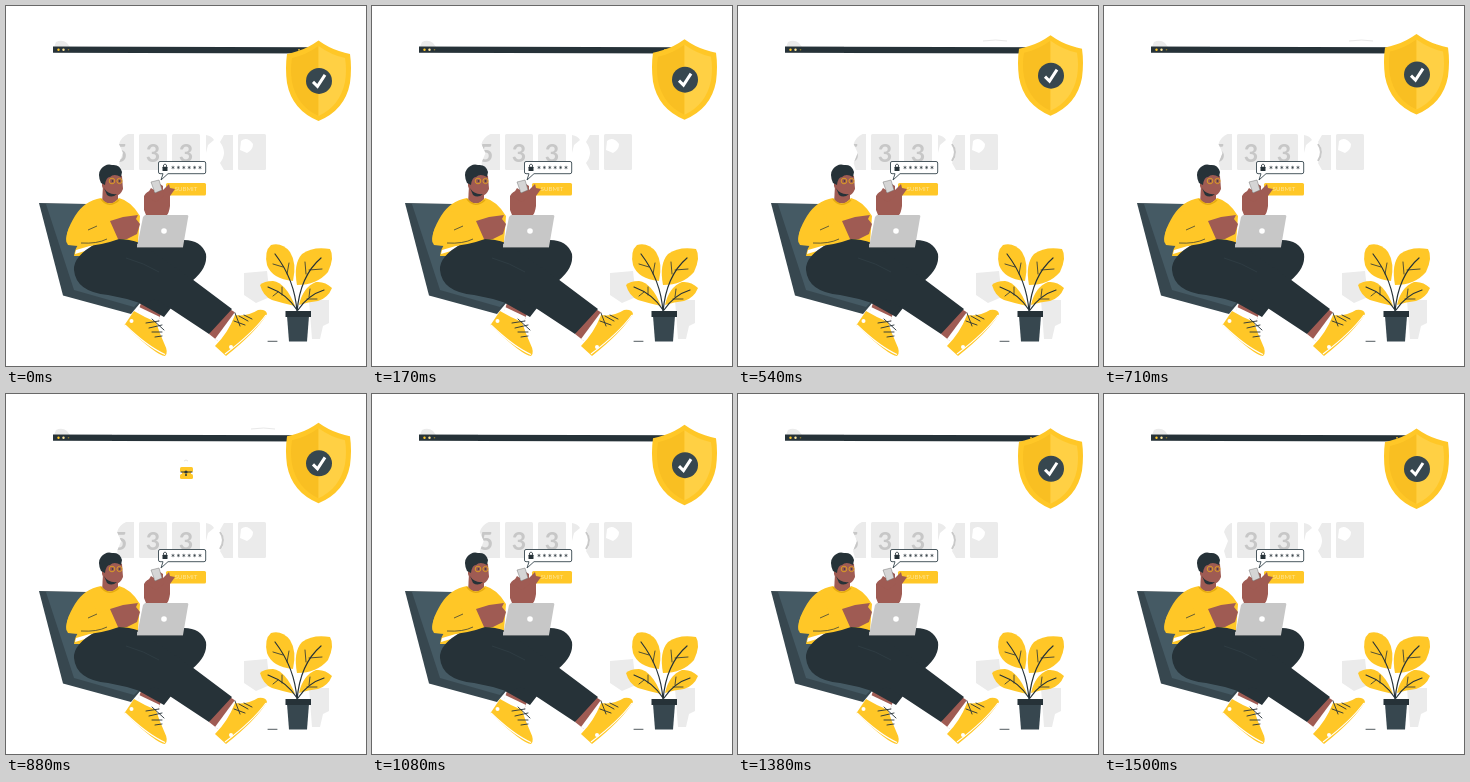
Animation, 360 px wide and 360 px high, one loop 1.54 s. Source, as an HTML page:

```html
<!DOCTYPE html>
<html lang="en">
<head>
<meta charset="utf-8">
<style>
html, body { margin: 0; width: 100%; height: 100%; overflow: hidden; background: #fff; }
svg { display: block; width: 100vw; height: 100vh; }
.dark { fill: #263238; }
.slate { fill: #37474f; }
.sun { fill: #ffc727; }
.skin { fill: #9f5b53; }
.pale { fill: #ebebeb; }
.white { fill: #fff; }
.line { fill: none; stroke: #263238; stroke-linecap: round; stroke-linejoin: round; }
.digit { font: 700 25px Lato, sans-serif; fill: #c7c7c7; text-anchor: middle; }
</style>
</head>
<body>
<svg viewBox="0 0 360 360">
  <defs>
    <clipPath id="reveal"><path id="tear"/></clipPath>
  </defs>

  <!-- browser bar -->
  <path class="pale" d="M48 41 L50 36 Q56 33 61 37 L64 41Z"/>
  <path id="hairline" d="M245 35 Q258 33 269 35" fill="none" stroke="#e8e8e8"/>
  <path class="dark" d="M47 40.6 L304 41.2 V47.4 L47 46.8Z"/>
  <g class="sun">
    <circle cx="52.5" cy="43.8" r="1.2"/>
    <circle cx="57.5" cy="43.8" r="1.2" fill="#ffe7a0"/>
    <circle cx="62.5" cy="43.8" r=".8" opacity=".5"/>
    <circle cx="293" cy="43.8" r=".9"/>
  </g>

  <!-- code cards -->
  <g clip-path="url(#reveal)">
    <path class="pale" d="M104 128 H128 V164 H104Z"/>
    <text class="digit" x="114" y="155.500">5</text>
  </g>
  <rect class="pale" x="133" y="128" width="28" height="36" rx="1.500"/>
  <rect class="pale" x="166" y="128" width="28" height="36" rx="1.500"/>
  <text class="digit" x="147" y="155.500">3</text>
  <text class="digit" x="180" y="155.500">3</text>
  <path class="pale" d="M200 129 Q206 130 208 134 L202 139 L200 147Z"/>
  <path class="pale" d="M218 129 H227 V164 H218 L214 157 Q222 147 214 136Z"/>
  <path id="arc" d="M214 138 Q220 146 214 155" fill="none" stroke="#c9c9c9" stroke-width="2"/>
  <rect class="pale" x="232" y="128" width="28" height="36" rx="1.500"/>
  <path class="white" d="M235 135 Q241 130 247 138 Q247 144 241 147 L234 144Z"/>

  <!-- padlock -->
  <g id="padlock">
    <path d="M178 67 Q180 65 182 67" fill="none" stroke="#e5e5e5"/>
    <rect class="sun" x="174" y="73" width="13" height="5" rx="1.500"/>
    <rect class="sun" x="174" y="80" width="13" height="5" rx="1.500"/>
    <rect class="sun" x="176" y="76" width="9" height="6"/>
    <path class="line" d="M175 78 H186" stroke-width="1"/>
    <circle class="dark" cx="180" cy="78" r="1.600"/>
    <circle class="dark" cx="180" cy="81" r="1"/>
  </g>

  <!-- shield -->
  <g id="shield">
    <path class="sun" d="M312.500 34.500 Q302 42 292 45 Q286 47 281 48 Q279 62 281 77 Q286 104 312.500 115 Q339 104 344 77 Q346 62 344 48 Q339 47 333 45 Q323 42 312.500 34.500Z"/>
    <path fill="#f9bf22" d="M312.500 40 Q300 49 286 52 Q284 64 286 76 Q291 100 312.500 110Z"/>
    <path fill="#ffd044" d="M312.500 40 Q325 49 339 52 Q341 64 339 76 Q334 100 312.500 110Z"/>
    <circle class="slate" cx="313" cy="75" r="13"/>
    <path d="M307 76 L311.5 80.5 L319 69" fill="none" stroke="#fff" stroke-width="3"/>
  </g>

  <!-- chair -->
  <path class="slate" d="M33 197 L82 198 L140 290 L125 308 L57 289.500Z"/>
  <path fill="#455a64" d="M40 198 L82 198 L138 291 L128 301 L68 284Z"/>

  <!-- far leg and shoe -->
  <path class="skin" d="M137 291 L157 302 L152 316 L132 306Z"/>
  <path class="white" d="M133 301 L154 311 L151 318 L131 309Z"/>
  <path class="dark" d="M130 242 L178 234 Q195 234 200 248 Q202 262 186 275 L158 311 L133 297 Q144 278 153 266Z"/>
  <path class="sun" d="M128 305 Q138 311 150 316 Q153 326 158 337 Q163 347 159 350 Q151 350 118.500 319Z"/>
  <path d="M119 319 Q142 341 159 348.500" fill="none" stroke="#fff" stroke-width="1.200"/>
  <path class="line" d="M140 317 L153 315 M143 322 L156 319 M146 326 L156 326 M149 331 L156 330 M146 313 L158 324" stroke-width=".9"/>
  <circle class="white" cx="125.500" cy="315" r="2"/>

  <!-- near leg and shoe -->
  <path class="skin" d="M219 300 L230 307 L212 335 L203 328Z"/>
  <path class="white" d="M229 306 L234 310 L216 338 L209 333Z"/>
  <path class="sun" d="M229 309 Q241 311 252 304 Q260 303 261 308 Q250 326 220 350 L209 340 Q222 327 229 309Z"/>
  <path d="M219 348 Q247 327 260 309" fill="none" stroke="#fff" stroke-width="1.200"/>
  <path class="line" d="M228 315 L239 319 M233 310 L242 315 M238 309 L246 313 M229 307 L234 320" stroke-width=".9"/>
  <circle class="white" cx="225" cy="341" r="2"/>
  <path class="line" d="M262 335.300 H271" stroke-width=".8"/>

  <!-- body -->
  <path class="skin" d="M97 180 L112 184 L112 198 L96 197Z"/>
  <path class="sun" d="M95 192 Q103 203 113 192 Q125 195 134 210 L131 250 H68 Q69 242 74 236 L61 237 Q58 228 69 210 Q78 195 95 192Z"/>
  <path d="M95 193 Q103 203 113 194" fill="none" stroke="#e5ab10" stroke-width="1.5"/>
  <path class="white" d="M70 244 L101 235 L99 239 L69 248Z"/>
  <path class="dark" d="M68 264 Q67 250 91 237 Q112 229 134 237 Q162 256 186 273 L226 303 L203 328 L150 293 L137 298 Q120 292 102 289 Q70 286 68 264Z"/>
  <path d="M153 266 Q138 257 120 252" fill="none" stroke="#34434a" stroke-width=".6"/>
  <path class="sun" d="M77 204 Q90 208 91 220 L104 214 L113 233 Q86 243 62 239 Q58 235 63 222Z"/>
  <path d="M91 220 L82 224 M75 237 Q91 238 101 233" fill="none" stroke="#263238" stroke-width=".7"/>
  <path class="skin" d="M104 215 L117 211 L132 209 L130 213 L134 218 L131 228 L121 233 L112 233Z"/>

  <!-- head -->
  <path class="skin" d="M96 174 Q107 163 116 170 L117 183 Q114 191 107 190 Q98 188 96 180Z"/>
  <path class="dark" d="M95 177 Q91 168 95 163 Q100 157 106 159 Q114 158 116 166 L115 171 Q108 167 104 171 Q100 171 99 179Z"/>
  <path class="dark" d="M98 182 Q102 189 111 188 Q106 192.500 101 189Z"/>
  <g fill="none" stroke="#e0a321" stroke-width=".9">
    <circle cx="106" cy="175" r="2.800"/>
    <circle cx="113.500" cy="175" r="2.600"/>
  </g>
  <circle class="dark" cx="106.500" cy="175" r=".8"/>
  <circle class="dark" cx="113.500" cy="175" r=".8"/>

  <!-- laptop -->
  <path fill="#a9a9a9" d="M131 238 H177 V241.500 H131Z"/>
  <path fill="#c7c7c7" d="M139 209 H181 Q183 209 182 212 L177 241 H131 L137 211Z"/>
  <circle class="white" cx="158" cy="225" r="2.8"/>

  <!-- message, button, hand with phone -->
  <rect class="sun" x="160" y="177" width="40" height="12.400" rx="1.5"/>
  <text x="180" y="185.300" font-family="Lato, sans-serif" font-size="6" text-anchor="middle" fill="#ffe596">SUBMIT</text>
  <path class="skin" d="M138 204 L138 190 Q142 183 149 186 L154 178 L157 180 L157 184 L163 178 L164 182 L169 183 L164 190 L164 200 Q163 207 161 209 H140Z"/>
  <path fill="#d5d5d5" stroke="#777" stroke-width=".5" d="M145 176 L153 174 L156 184 L149 187Z"/>
  <path class="skin" d="M140 190 L145 182 L148 184 L148 189 L157 184 L158 190 L150 196Z"/>
  <path class="white" stroke="#37474f" stroke-width=".9" d="M154 155.500 H198 Q199.700 155.500 199.700 157 V166 Q199.700 167.700 198 167.700 H162 L155 174 L157 167.700 H154 Q152.500 167.700 152.500 166 V157 Q152.500 155.500 154 155.500Z"/>
  <rect class="dark" x="156.500" y="160.800" width="5" height="4.200" rx=".5"/>
  <path class="line" d="M157.500 160.500 V159 Q159 157 160.500 159 V160.500" stroke-width=".8"/>
  <g id="stars" class="line" stroke-width=".6"></g>

  <!-- plant -->
  <path class="pale" d="M238 267 L261 265 L264 291 L250 297 L238 289Z"/>
  <path class="pale" d="M303 294 H323 V317 L317 320 L314 333 H306Z"/>
  <g class="sun">
    <path d="M287 275 Q266 273 261 259 Q258 245 265 239 Q276 236 284 246 Q291 257 287 275Z"/>
    <path d="M291 279 Q287 258 296 248 Q307 240 324 243 Q329 251 322 266 Q311 279 291 279Z"/>
    <path d="M289 300 Q280 277 267 275 Q258 275 254 279 Q257 290 266 294 Q276 297 289 300Z"/>
    <path d="M293 299 Q297 281 310 276 Q319 275 326 282 Q322 292 312 295 Q302 296 293 299Z"/>
  </g>
  <path class="line" stroke-width="1.200" d="M291 306 Q289 274 269 248 M291 306 Q294 270 315 252 M291 304 Q281 288 262 281 M292 304 Q302 289 318 284"/>
  <path class="line" stroke-width=".8" d="M277 261 L267 258 M281 268 L283 257 M300 268 L299 256 M303 264 L316 263 M272 286 L267 290 M276 289 L276 281 M303 291 L304 283 M301 293 L311 293"/>
  <path class="slate" d="M281 310 H303 L301 335.500 H283Z"/>
  <rect class="dark" x="279.500" y="305" width="25.500" height="6"/>
</svg>
<script>
const LOOP = 1540, FPS = 24;
const get = id => document.getElementById(id);

// Six asterisks inside the message
get('stars').innerHTML = [0, 1, 2, 3, 4, 5].map(i =>
  `<path transform="translate(${167 + i * 5.4} 161.500)" d="M0-1.300V1.300M-1.100-.6L1.100.6M-1.100.6L1.100-.6"/>`).join('');

// Left edge of the torn first card: [time, x]
const edges = [[0, 113], [330, 106], [540, 118], [880, 111], [1080, 107], [1250, 110], [1500, 120], [LOOP, 113]];

function edgeAt(t) {
  const i = edges.findIndex(([time]) => time > t);
  const [t0, x0] = edges[i - 1], [t1, x1] = edges[i];
  return x0 + (x1 - x0) * (t - t0) / (t1 - t0);
}

function show(id, visible) {
  get(id).style.visibility = visible ? 'visible' : 'hidden';
}

function draw(now) {
  const t = Math.floor(now % LOOP * FPS / 1000) * 1000 / FPS;
  const lift = 3.2 * (1 - Math.cos(2 * Math.PI * (t + 65) / LOOP));
  get('shield').setAttribute('transform', `translate(0 ${-lift})`);

  const x = edgeAt(t);
  get('tear').setAttribute('d', `M${x + 9} 128H128V164H${x + 2}L${x} 157L${x + 4} 147L${x} 138Q${x + 2} 131 ${x + 9} 128Z`);

  show('padlock', t > 790 && t < 960);
  show('hairline', t > 450 && t < 920);
  show('arc', t > 200 && t < 1460);
  requestAnimationFrame(draw);
}
requestAnimationFrame(draw);
</script>
</body>
</html>
```
